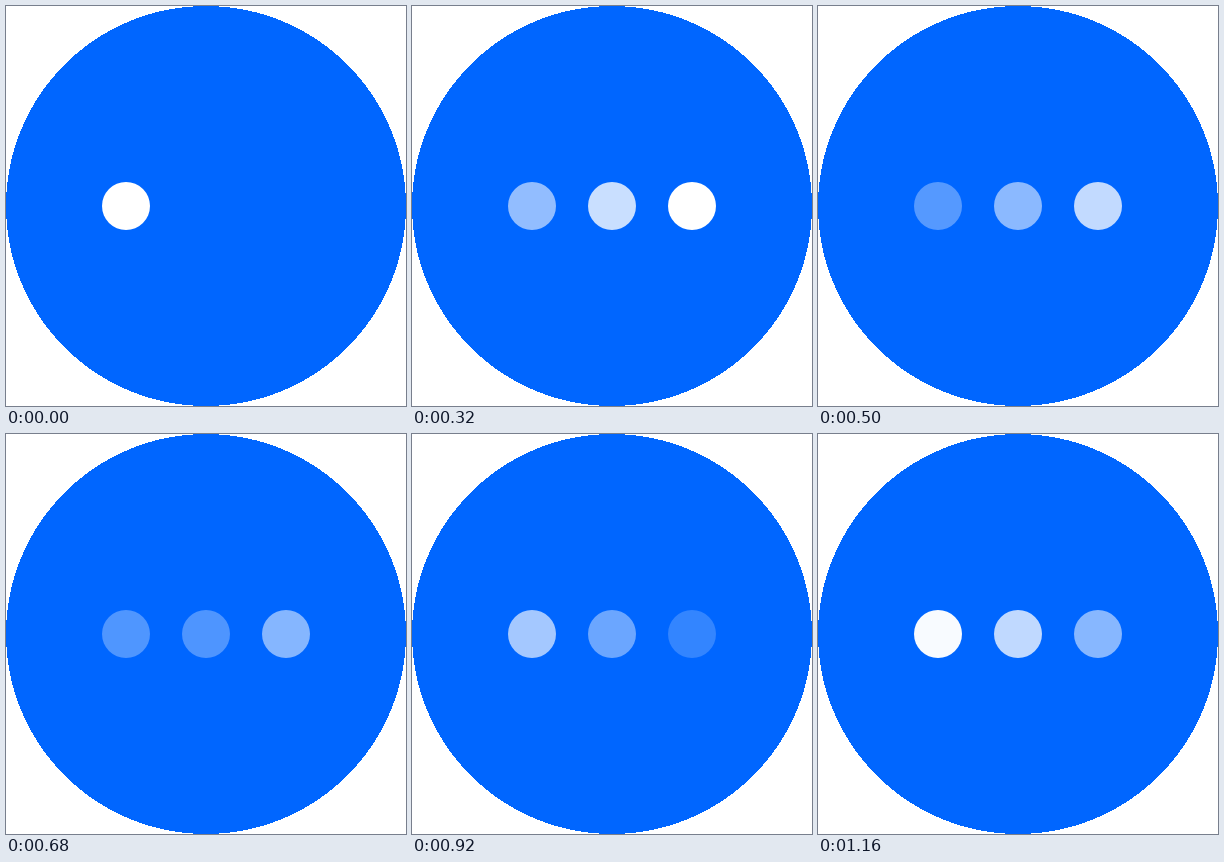
An HTML page for the animation above (1.2 s loop, 400 px wide and 400 px high).

```html
<!DOCTYPE html>
<html lang="en">
<head>
<meta charset="utf-8">
<title>Three pulsing dots</title>
<style>
  html, body { margin: 0; height: 100%; overflow: hidden; background: #fff; }
  svg { display: block; width: 100%; height: 100%; }
</style>
</head>
<body>
<svg viewBox="0 0 400 400">
  <circle cx="200" cy="200" r="200" fill="#06f" shape-rendering="crispEdges"/>
  <g fill="#fff">
    <circle class="dot" cx="120" cy="200" r="24"/>
    <circle class="dot" cx="200" cy="200" r="24" opacity="0"/>
    <circle class="dot" cx="280" cy="200" r="24" opacity="0"/>
  </g>
</svg>
<script>
  const LOOP = 1200, DELAY = 160, STEP = 60, LOW = 0.2, TURN = 600, END = 1180;
  const dots = document.querySelectorAll('.dot');

  // Steps of 60 ms that restart whenever a new dot appears
  function hold(t) {
    const start = Math.min(Math.floor(t / DELAY), 2) * DELAY;
    return start + Math.floor((t - start) / STEP) * STEP;
  }

  // Hidden before its turn, then fades down and back up
  function opacity(t) {
    if (t < 0) return 0;
    const k = t < TURN ? 1 - t / TURN : (t - TURN) / (END - TURN);
    return LOW + (1 - LOW) * Math.min(k, 1);
  }

  const origin = performance.now();
  function draw(now) {
    const t = hold(Math.max(0, now - origin) % LOOP);
    dots.forEach((dot, i) => dot.setAttribute('opacity', opacity(t - i * DELAY)));
    requestAnimationFrame(draw);
  }
  draw(origin);
</script>
</body>
</html>
```
